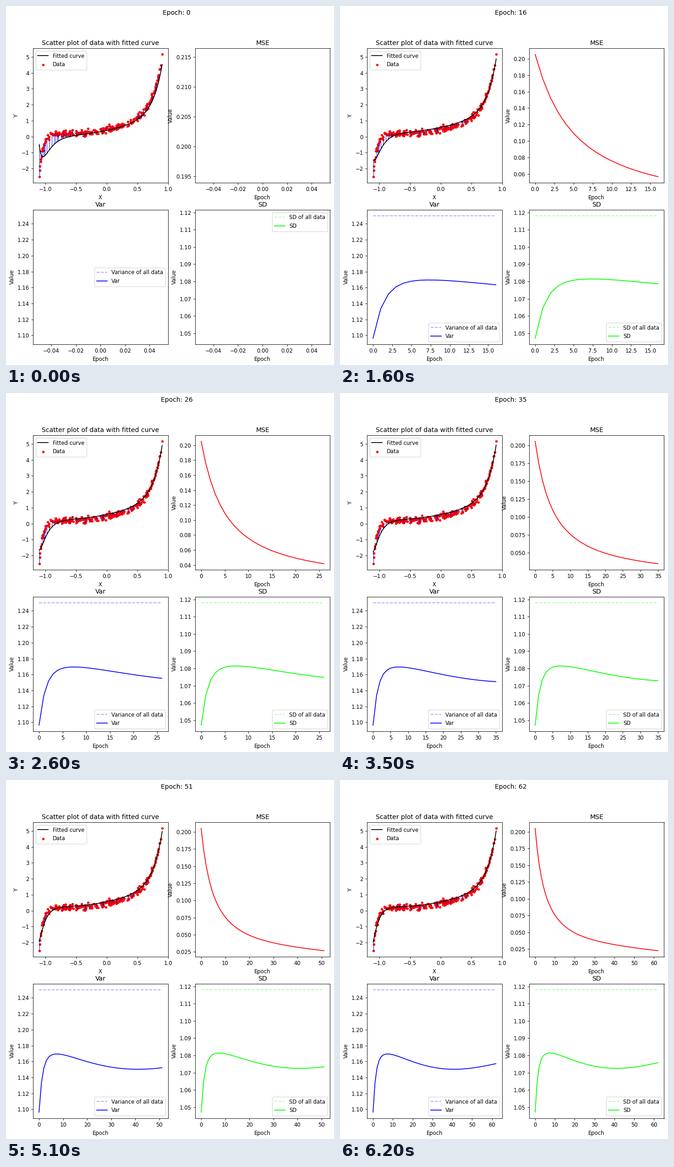
Write a matplotlib script that moves like this. It is 716 px wide and 782 px high and loops after 6.3 s.

```python
import numpy as np
import matplotlib.pyplot as plt
from matplotlib.animation import FuncAnimation

W, H, DPI = 716, 782, 83.75
EPOCHS = 63
TOTAL_VAR = 1.25
X_MIN, X_MAX = -1.097, 0.905
Y_MIN, Y_MAX = -2.51, 5.16

plt.rcParams["font.family"] = "DejaVu Sans"


def trend(x):
    return (0.44 + 0.75 * x + 0.55 * x**2 + 3.45 * np.exp(6.5 * (x - 0.9))
            - 2.78 * np.exp(-16 * (x + 1.1)))


def fitted(x, epoch):
    """Curve after some training: quick settling first, then slow drift."""
    settle = np.exp(-epoch / 4)
    offset = 0.58 - 0.2 * settle - 0.00065 * epoch
    rise = 3.07 + 0.003 * epoch - 0.11 * settle
    drop = 3.65 - 1.1 * np.exp(-epoch / 17) + 0.68 * settle
    rate = 6 + 0.112 * epoch + 0.8 * settle
    hook = drop - 0.57 - 0.435 * np.log1p(epoch)
    u = x + 1.1
    return (offset + 0.75 * x + 0.5 * x**2 + rise * np.exp(6.8 * (x - 0.9))
            - drop * np.exp(-rate * u) + hook * np.exp(-21 * u))


def mse_at(e):
    return 0.0555 * np.exp(-e / 69) + 0.0905 * 0.884**e + 0.0592 * 0.685**e


def var_at(e):
    d = e - 41
    slow = 1.1503 + 2.099e-5 * d**2 - 1.495e-7 * d**3 - 4.49e-9 * d**4
    return slow - 0.0267 * 0.78**e - 0.06 * 0.46**e


rng = np.random.default_rng(7)
px = np.sort(rng.uniform(X_MIN, X_MAX, 270))
px[[0, -1]] = X_MIN, X_MAX
py = np.clip(trend(px) + rng.normal(0, 0.11, px.size), Y_MIN, Y_MAX)
py[[0, -1]] = Y_MIN, Y_MAX
sx, sy = px[::4], py[::4]
curve_x = np.linspace(X_MIN, X_MAX, 160)

epochs = np.arange(EPOCHS, dtype=float)
mse, var = mse_at(epochs), var_at(epochs)

fig, ((ax_fit, ax_mse), (ax_var, ax_sd)) = plt.subplots(
    2, 2, figsize=(W / DPI, H / DPI), dpi=DPI)
fig.subplots_adjust(left=58.7 / W, right=707.5 / W, bottom=1 - 736.8 / H,
                    top=1 - 92.1 / H, wspace=0.2, hspace=0.2)
heading = fig.suptitle("Epoch: 0", x=372.7 / W, y=1 - 8.4 / H)

curve, = ax_fit.plot([], [], color="black", label="Fitted curve", zorder=3)
ax_fit.scatter(px, py, s=13, color="red", label="Data")
stems = ax_fit.vlines(sx, sy, sy, color="blue", linewidth=0.8, zorder=2)
ax_fit.set(title="Scatter plot of data with fitted curve", xlabel="X",
           ylabel="Y", xlim=(-1.2, 1.0), ylim=(-2.9, 5.545))
ax_fit.legend(loc="upper left")


def history(ax, title, color, values, total=None, total_label=None):
    """Set up a growing chart; return its axes and (line, series) pairs."""
    pairs = []
    if total is not None:
        dashed, = ax.plot([], [], "--", color=color, alpha=0.35,
                          label=total_label)
        pairs.append((dashed, np.full(EPOCHS, total)))
    line, = ax.plot([], [], color=color, label=title)
    pairs.append((line, values))
    ax.set(title=title, xlabel="Epoch", ylabel="Value")
    if total is not None:
        ax.legend(loc="best")
    return ax, pairs


charts = [
    history(ax_mse, "MSE", "red", mse),
    history(ax_var, "Var", "blue", var, TOTAL_VAR, "Variance of all data"),
    history(ax_sd, "SD", "lime", np.sqrt(var), np.sqrt(TOTAL_VAR),
            "SD of all data"),
]


def update(epoch):
    heading.set_text(f"Epoch: {epoch}")
    curve.set_data(curve_x, fitted(curve_x, epoch))
    ends = fitted(sx, epoch)
    stems.set_segments([[(x, a), (x, b)] for x, a, b in zip(sx, sy, ends)])
    for ax, pairs in charts:
        for line, values in pairs:
            line.set_data(epochs[:epoch + 1], values[:epoch + 1])
        ax.relim()
        ax.autoscale_view()
    return []


anim = FuncAnimation(fig, update, frames=EPOCHS, interval=100, repeat=True,
                     repeat_delay=0, blit=False)
plt.show()
```
